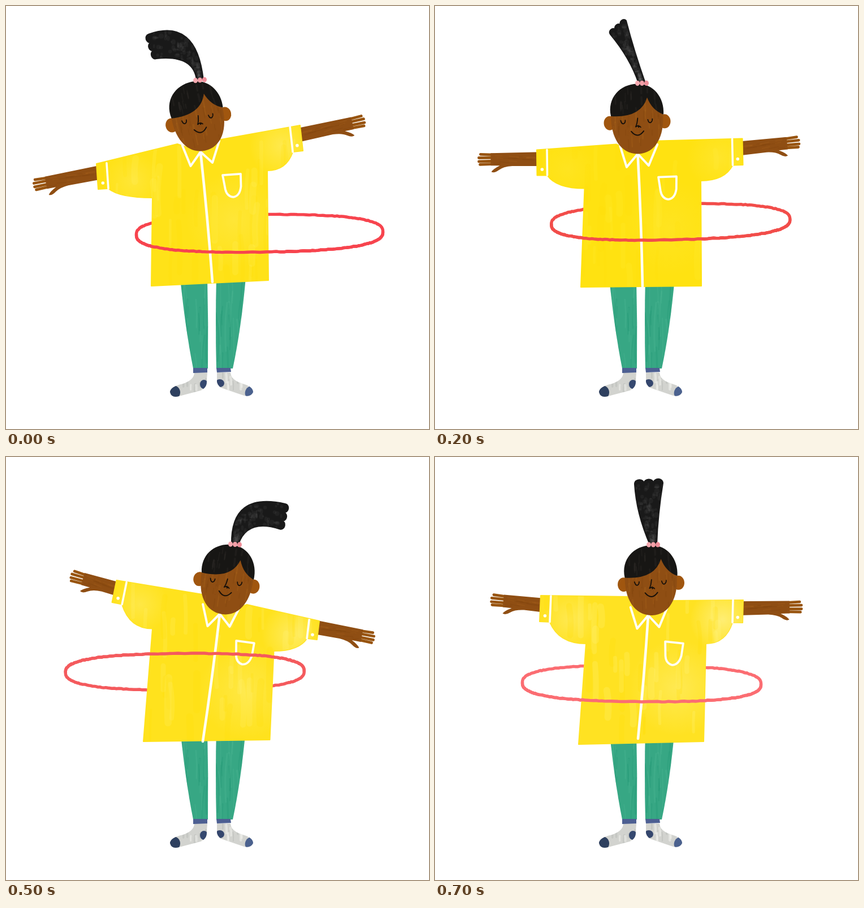
Animation, 748 px wide and 748 px high, one loop 800 ms. Source, as an HTML page with a canvas:

```html
<!DOCTYPE html>
<html lang="en">
<head>
<meta charset="utf-8">
<title>Hula hoop</title>
<style>
html, body { margin: 0; width: 100%; height: 100%; overflow: hidden; background: #fff; }
canvas { display: block; width: 100vw; height: 100vh; }
</style>
</head>
<body>
<canvas id="stage" width="748" height="748"></canvas>
<script>
const ctx = document.getElementById('stage').getContext('2d');
const STEP = 100;

// Key poses. cuffs: top and bottom corner; tail: left control, left tip, right tip, right control;
// hoop: centre, radii, tilt; front: 1 when the lower half passes in front, -1 for the upper half.
const lean = {
  head: [340, 200, -12], neck: [344, 258], seam: [365, 488],
  topL: [303, 244], topR: [380, 236],
  cuffL: [160, 279, 163, 324], cuffR: [520, 211, 525, 256],
  underL: [259, 339], underR: [462, 291], hemL: [257, 495], hemR: [464, 485],
  handL: [47, 317], handR: [636, 202], pocket: [399, 298, -4], bun: [343, 131],
  tail: [332, 86, 266, 93, 252, 50, 337, 20],
  hoop: [448.5, 402, 218, 33, -.7], ink: [247, 68, 78], pale: [.6], front: 1
};
const drop = {
  head: [353, 203, -7], neck: [358, 261], seam: [375, 498],
  topL: [316, 247], topR: [392, 237],
  cuffL: [180, 265, 181, 308], cuffR: [544, 230, 546, 273],
  underL: [267, 331], underR: [470, 303], hemL: [260, 498], hemR: [475, 499],
  handL: [61, 288], handR: [649, 233], pocket: [411, 301, -4], bun: [359, 134],
  tail: [314, 87, 287, 160, 250, 147, 302, 33],
  hoop: [472.5, 373, 211, 32, -2.5], ink: [249, 88, 76], pale: [.4], front: 1
};
const rise = {
  head: [362, 206, 3], neck: [359, 262], seam: [359, 494],
  topL: [325, 242], topR: [400, 240],
  cuffL: [180, 244, 180, 291], cuffR: [543, 239, 543, 289],
  underL: [262, 314], underR: [470, 315], hemL: [256, 496], hemR: [467, 491],
  handL: [88, 255], handR: [644, 247], pocket: [411, 303, 0], bun: [373, 139],
  tail: [353, 85, 350, 28, 402, 33, 388, 85],
  hoop: [361, 390.5, 211, 31, 0], ink: [234, 65, 72], pale: [.15], front: -1
};
const swing = {
  head: [394, 222, 9], neck: [379, 277], seam: [345, 505],
  topL: [352, 243], topR: [430, 262],
  cuffL: [200, 219, 192, 258], cuffR: [557, 291, 553, 325],
  underL: [262, 306], underR: [477, 345], hemL: [246, 504], hemR: [470, 501],
  handL: [113, 209], handR: [653, 321], pocket: [424, 322, 8], bun: [410, 156],
  tail: [400, 64, 501, 86, 490, 131, 434, 110],
  hoop: [321.5, 382.5, 211, 31.5, -1.2], ink: [238, 81, 87], pale: [.8], front: -1
};
const hang = {
  head: [386, 221, 7], neck: [377, 278], seam: [351, 501],
  topL: [343, 243], topR: [422, 260],
  cuffL: [191, 217, 183, 256], cuffR: [551, 289, 547, 321],
  underL: [256, 301], underR: [470, 341], hemL: [240, 502], hemR: [463, 499],
  handL: [113, 209], handR: [653, 320], pocket: [422, 332, 7], bun: [400, 153],
  tail: [394, 58, 487, 80, 479, 124, 418, 107],
  hoop: [311, 377, 211, 33, .6], ink: [250, 98, 98], pale: [.8], front: 1
};
const back = {
  head: [382, 223, -2], neck: [377, 280], seam: [359, 498],
  topL: [340, 247], topR: [418, 254],
  cuffL: [187, 245, 185, 291], cuffR: [545, 253, 544, 293],
  underL: [267, 330], underR: [479, 330], hemL: [254, 508], hemR: [475, 503],
  handL: [97, 252], handR: [651, 265], pocket: [423, 328, 6], bun: [386, 155],
  tail: [356, 100, 353, 48, 403, 46, 394, 100],
  hoop: [365.5, 400.5, 211, 32, .4], ink: [251, 109, 114], pale: [1], front: 1
};

const lerp = (a, b, t) => a + (b - a) * t;
function between(a, b, changes) {
  const out = {};
  for (const k in a) if (k !== 'front') out[k] = a[k].map((v, i) => lerp(v, b[k][i], .5));
  return Object.assign(out, changes);
}
const lift = between(drop, rise, { front: 1, tail: [345, 92, 310, 50, 338, 26, 352, 80] });
const sway = between(swing, hang, { front: -1 });
const poses = [lean, drop, lift, rise, swing, sway, hang, back];

function seeded(s) {
  return () => {
    s = (s * 1664525 + 1013904223) >>> 0;
    return s / 4294967296;
  };
}
const rad = d => d * Math.PI / 180;
function turn([x, y], deg, [ox, oy]) {
  const c = Math.cos(rad(deg)), s = Math.sin(rad(deg));
  return [ox + x * c - y * s, oy + x * s + y * c];
}

function fill(d, color) {
  ctx.fillStyle = color;
  ctx.fill(new Path2D(d));
}
function line(d, color, width) {
  ctx.strokeStyle = color;
  ctx.lineWidth = width;
  ctx.stroke(new Path2D(d));
}
function blob(x, y, rx, ry, color, rot = 0) {
  ctx.fillStyle = color;
  ctx.beginPath();
  ctx.ellipse(x, y, rx, ry, rot, 0, 7);
  ctx.fill();
}
function glow(x, y, r, rgb, alpha) {
  const g = ctx.createRadialGradient(x, y, 0, x, y, r);
  g.addColorStop(0, `rgba(${rgb},${alpha})`);
  g.addColorStop(1, `rgba(${rgb},0)`);
  ctx.fillStyle = g;
  ctx.fillRect(x - r, y - r, r * 2, r * 2);
}

// Brush streaks inside a shape
function brush(d, [x, y, w, h], n, colors, [thin, thick], [short, long], seed) {
  const rnd = seeded(seed);
  ctx.save();
  ctx.clip(new Path2D(d));
  for (let i = 0; i < n; i++) {
    const sx = x + rnd() * w, sy = y + rnd() * h, len = lerp(short, long, rnd());
    const bend = (rnd() - .5) * len * .2;
    line(`M${sx} ${sy} q${bend} ${len / 2} ${bend * .4} ${len}`,
      colors[i % colors.length], lerp(thin, thick, rnd()));
  }
  ctx.restore();
}

const skin = '#8f4e13', warm = 'rgba(176,104,30,.25)', umber = 'rgba(110,56,10,.16)';

function legs() {
  const left = 'M308 480 Q317 570 331 641 L357 641 Q358 560 356 480Z';
  const right = 'M372 480 Q370 560 372 641 L401 641 Q416 570 424 480Z';
  const tints = ['rgba(24,140,104,.2)', 'rgba(90,190,155,.2)'];
  [left, right].forEach((d, i) => {
    fill(d, '#37a784');
    brush(d, [i ? 370 : 308, 480, 54, 140], 26, tints, [1, 4], [30, 90], 11 + i);
  });

  const sockL = 'M333 648 Q333 661 313 668 Q290 673 290 683 Q293 694 306 690 L344 680 Q356 675 355 662 L356 648Z';
  const sockR = 'M373 648 L373 665 Q375 674 386 677 L418 688 Q432 693 437 683 Q437 674 422 669 Q397 662 397 648Z';
  [sockL, sockR].forEach((d, i) => {
    fill(d, '#d2d3cf');
    brush(d, [i ? 373 : 290, 645, 66, 30], 16, ['rgba(245,245,242,.5)', 'rgba(165,168,166,.3)'], [2, 5], [6, 18], 31 + i);
  });
  ctx.save();
  ctx.clip(new Path2D(sockL + sockR));
  blob(297, 683, 11, 12, '#2e405f', -.2);
  blob(350, 669, 7, 8, '#35486f');
  blob(432, 683, 9, 11, '#4b618e', .4);
  blob(378, 667, 8, 7, '#34466d');
  ctx.restore();
  fill('M331 640 L356 640 L356 648 L331 649Z M372 640 L397 640 L398 647 L373 648Z', '#4d5f92');
}

function arm(hand, cuff, side) {
  const dx = (lerp(cuff[0], cuff[2], .36) - hand[0]) * side;
  const dy = lerp(cuff[1], cuff[3], .36) - hand[1];
  const len = Math.hypot(dx, dy) + 16;
  const limb = `M24 -11 L${len} -12.5 L${len} 12.5 L62 12 Q46 13 38 19 Q30 25 25 22 Q28 17 40 11 L24 11Z`;
  ctx.save();
  ctx.translate(...hand);
  ctx.scale(side, 1);
  ctx.rotate(Math.atan2(dy, dx));
  line('M6 -9 L30 -8 M3 -3 L30 -3 M3 3.5 L30 3 M5 9 L30 8', '#98540f', 4.8);
  fill(limb, skin);
  const rnd = seeded(5);
  for (let i = 0; i < 14; i++) {
    const x = 26 + rnd() * (len - 60), y = (rnd() - .5) * 19;
    line(`M${x} ${y} l${10 + rnd() * 24} ${rnd() * 2}`, i % 2 ? warm : umber, 1.6);
  }
  ctx.restore();
}

// Corners of a cuff's stitching, set inwards from its edge
function cuffSeam([tx, ty, bx, by], side) {
  const k = 18 * side / Math.hypot(bx - tx, by - ty);
  const ox = (by - ty) * k, oy = (tx - bx) * k;
  return [tx + ox, ty + oy, bx + ox, by + oy];
}

function shirt(p, seed) {
  const sl = cuffSeam(p.cuffL, 1), sr = cuffSeam(p.cuffR, -1);
  const pull = (s, u) => `${lerp(s[2], u[0], .25)} ${u[1]}`;
  const body = `M${p.topL} L${p.cuffL.slice(0, 2)} L${p.cuffL.slice(2)} L${sl.slice(2)}
    Q${pull(sl, p.underL)} ${p.underL}
    L${p.hemL} L${p.hemR} L${p.underR} Q${pull(sr, p.underR)} ${sr.slice(2)}
    L${p.cuffR.slice(2)} L${p.cuffR.slice(0, 2)} L${p.topR} L${p.neck}Z`;
  const yellow = `rgb(255,226,${Math.round(10 + 24 * p.pale[0])})`;
  fill(body, yellow);
  line(body, yellow, 2);

  const pale = p.pale[0], cream = '255,246,170';
  ctx.save();
  ctx.clip(new Path2D(body));
  glow(lerp(p.underR[0], p.cuffR[0], .45), lerp(p.underR[1], p.cuffR[1], .55), 58, cream, .6 * pale);
  glow(lerp(p.underL[0], p.cuffL[0], .35), lerp(p.underL[1], p.cuffL[1], .5), 50, cream, .35 * pale);
  glow(lerp(p.neck[0], p.underR[0], .5), lerp(p.underR[1], p.hemR[1], .45), 85, cream, .35 * pale);
  ctx.restore();
  brush(body, [165, 215, 380, 250], 60,
    [`rgba(255,243,140,${.2 * pale})`, `rgba(255,218,0,${.1 + .12 * pale})`], [4, 13], [20, 90], seed);

  const at = (x, y) => turn([x, y], p.head[2] * .5, p.neck), white = '#fffef6';
  line(`M${at(-31, -15)} L${at(-20, 23)} L${p.neck} L${at(19, 21)} L${at(35, -16)}`, white, 4);
  line(`M${p.neck} Q${lerp(p.neck[0], p.seam[0], .5) + 2} ${lerp(p.neck[1], p.seam[1], .5)} ${p.seam}`, white, 4.6);
  [[sl, p.cuffL], [sr, p.cuffR]].forEach(([s, c]) => {
    const mid = i => (lerp(s[i], s[i + 2], .77) + lerp(c[i], c[i + 2], .77)) / 2;
    line(`M${s.slice(0, 2)} L${s.slice(2)}`, white, 3.6);
    blob(mid(0), mid(1), 2.8, 2.8, white);
  });

  ctx.save();
  ctx.translate(p.pocket[0], p.pocket[1]);
  ctx.rotate(rad(p.pocket[2]));
  line('M-16 0 L16 0 L15 22 Q12 39 0 40 Q-11 38 -13 25Z', white, 3.8);
  ctx.restore();
}

function tail(p) {
  const [bx, by] = p.bun, [ax, ay, lx, ly, rx, ry, cx, cy] = p.tail;
  const dx = (rx - lx) / 3, dy = (ry - ly) / 3, puff = .6;
  let tips = '';
  for (let i = 0; i < 3; i++) {
    const x = lx + dx * i, y = ly + dy * i, ox = dy * puff, oy = -dx * puff;
    tips += `C${x + ox} ${y + oy} ${x + dx + ox} ${y + dy + oy} ${x + dx} ${y + dy}`;
  }
  const d = `M${bx - 6} ${by} Q${ax} ${ay} ${lx} ${ly} ${tips} Q${cx} ${cy} ${bx + 6} ${by}Z`;
  fill(d, '#191919');
  line(d, '#191919', 2);

  const rnd = seeded(8), quad = (a, b, c, t) => lerp(lerp(a, b, t), lerp(b, c, t), t);
  ctx.save();
  ctx.clip(new Path2D(d));
  for (let i = 0; i < 90; i++) {
    const t = rnd(), s = rnd();
    const x = quad(bx, lerp(ax, cx, s), lerp(lx, rx, s), t);
    const y = quad(by, lerp(ay, cy, s), lerp(ly, ry, s), t);
    blob(x, y, 1 + rnd() * 4, 1 + rnd() * 4, 'rgba(150,150,150,.07)');
  }
  ctx.restore();
}

function head(p) {
  const [x, y, ang] = p.head;
  tail(p);
  ctx.save();
  ctx.translate(x, y);
  ctx.rotate(rad(ang));
  blob(-48.5, 1, 10.5, 12.5, '#a0560f');
  blob(48.5, 1, 10.5, 12.5, '#a0560f');
  const face = 'M-46 -14 C-48 28 -30 57 0 57 C30 57 48 28 46 -14 L20 -50 L-20 -50Z';
  fill(face, skin);
  brush(face, [-42, -42, 84, 80], 50, [warm, umber], [1.5, 3.5], [5, 22], 21);
  const hair = 'M-46 -11 C-52 -44 -28 -67 2 -67 C30 -67 50 -42 47 -11 Q27 -19 19 -42 Q7 -6 -46 -11Z';
  fill(hair, '#171614');
  brush(hair, [-40, -62, 80, 40], 18, ['rgba(90,84,76,.12)'], [1.5, 4], [6, 18], 4);
  const ink = '#17100a';
  line('M-29 -3 Q-28 3 -24.5 3 Q-21 2 -21 -3 M19 -3 Q20 3 23.5 2.5 Q27 1 27 -4', ink, 1.8);
  line('M1 -6 Q0 4 -3 9 L2 7 L2 10 L4 8 L6 10', ink, 1.8);
  line('M-11 17 Q0 31 11 17', ink, 2);
  ctx.restore();

  [[-8, '#f7a9b0'], [8, '#f08f9a'], [0, '#f5a0a8']].forEach(([o, c]) => {
    const [bx, by] = turn([o, 0], ang * .4, p.bun);
    blob(bx, by, 4, 4.6, c);
  });
}

// part 0 draws the full ring, 1 its lower half, -1 its upper half
function hoop(p, part) {
  const [cx, cy, rx, ry, tilt] = p.hoop, rnd = seeded(77), N = 260;
  const bend = v => Math.sign(v) * Math.abs(v) ** .77;
  ctx.strokeStyle = `rgb(${p.ink.map(Math.round)})`;
  ctx.lineWidth = 5.4;
  ctx.beginPath();
  let pen = false;
  for (let i = 0; i <= N; i++) {
    const a = i / N * Math.PI * 2, s = Math.sin(a), j = (rnd() - .5) * 1.1;
    if (part && s * part < -1e-6) { pen = false; continue; }
    const [x, y] = turn([rx * bend(Math.cos(a)), ry * bend(s) + j], tilt, [cx, cy]);
    pen ? ctx.lineTo(x, y) : ctx.moveTo(x, y);
    pen = true;
  }
  ctx.stroke();
}

function draw(now) {
  const i = Math.floor(now / STEP) % poses.length, p = poses[i];
  ctx.fillStyle = '#fff';
  ctx.fillRect(0, 0, 748, 748);
  ctx.lineCap = ctx.lineJoin = 'round';
  hoop(p, 0);
  legs();
  arm(p.handL, p.cuffL, 1);
  arm(p.handR, p.cuffR, -1);
  shirt(p, 100 + i * 13);
  head(p);
  hoop(p, p.front);
}

function loop() {
  draw(performance.now());
  requestAnimationFrame(loop);
}
loop();
</script>
</body>
</html>
```
